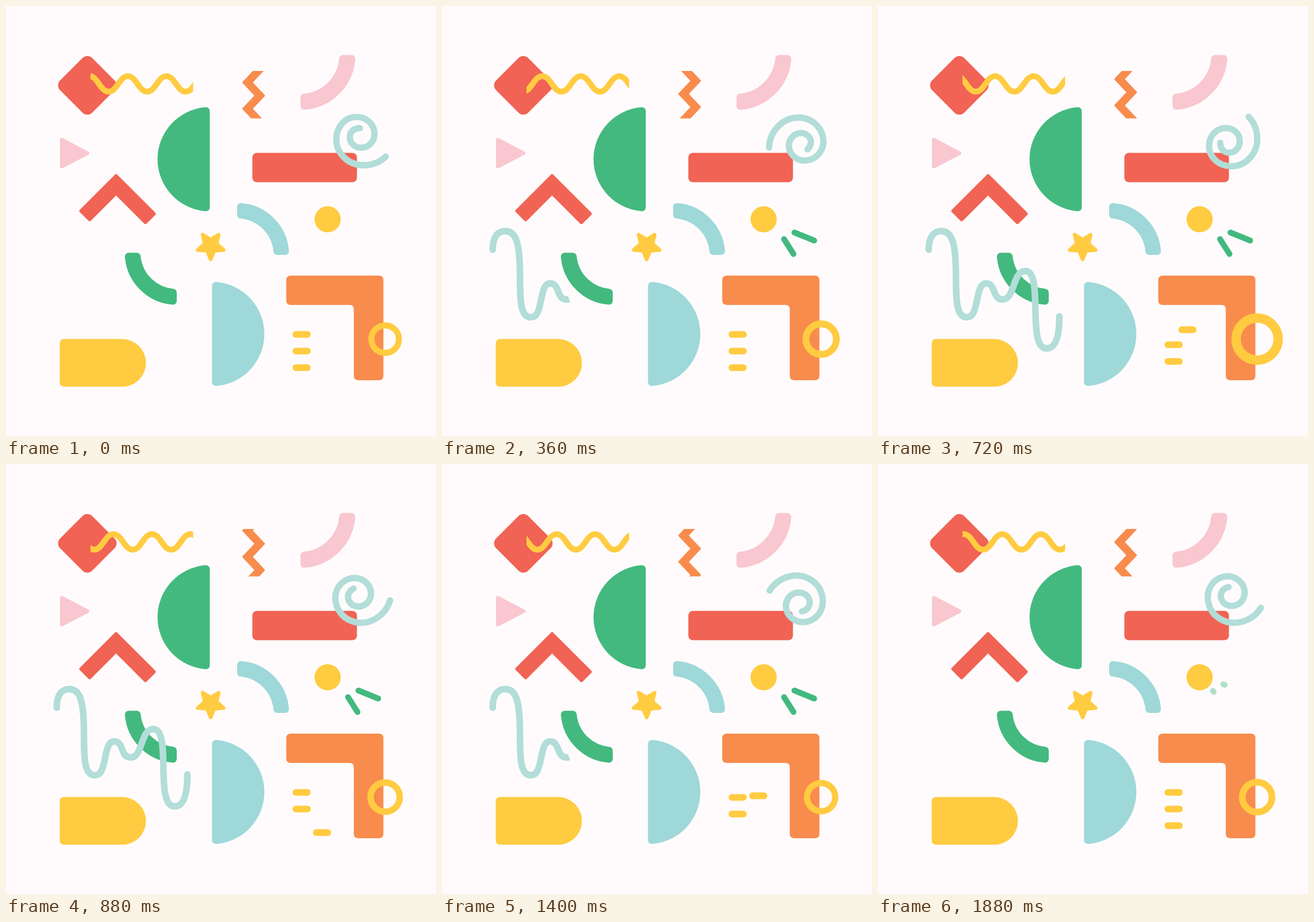
An HTML page that plays this animation: 748 px wide and 748 px high, repeating every 1920 ms.

```html
<!DOCTYPE html>
<html lang="en">
<head>
<meta charset="utf-8">
<title>Shapes</title>
<style>
  html, body { margin: 0; width: 100%; height: 100%; overflow: hidden; background: #fffbfc; }
  svg { display: block; width: 100%; height: 100%; }
  .red { fill: #f16354; stroke: #f16354; }
  .yellow { fill: #ffcb40; stroke: #ffcb40; }
  .green { fill: #43b97f; stroke: #43b97f; }
  .teal { fill: #9fd8d9; stroke: #9fd8d9; }
  .mint { fill: #b2ddd8; stroke: #b2ddd8; }
  .pink { fill: #f9c7cf; stroke: #f9c7cf; }
  .orange { fill: #f88c4d; stroke: #f88c4d; }
  .flat { stroke: none; }
  .line { fill: none; }
  .soft { stroke-width: 6; stroke-linejoin: round; }
  .round { stroke-linecap: round; }
</style>
</head>
<body>
<svg viewBox="0 0 748 748">
  <defs>
    <clipPath id="waveBox"><rect x="147" y="105" width="178.5" height="60"/></clipPath>
    <clipPath id="zigBox"><rect x="405" y="113" width="50" height="82.5"/></clipPath>
  </defs>

  <rect class="red flat" x="102" y="98.5" width="79" height="79" rx="12" transform="rotate(45 141.5 138)"/>
  <path class="pink soft" d="M97 232.5V279.5L142 256Z"/>
  <path class="green flat" d="M347 176Q354.5 176 354.5 183.5V349.5Q354.5 357 347 357A90.8 90.8 0 0 1 347 176Z"/>
  <path class="red soft" d="M191.5 295.5L257.5 361.5L242.5 376.5L191.5 325.5L145.5 371.5L130.5 356.5Z"/>
  <rect class="red flat" x="428.5" y="255.5" width="182" height="51" rx="8"/>
  <circle class="yellow flat" cx="559.5" cy="371" r="22.8"/>
  <path class="teal flat" d="M366 480Q358.3 480 358.3 487.5V653.5Q358.3 661 366 661A90.8 90.8 0 0 0 366 480Z"/>
  <path class="yellow flat" d="M101.5 579.3H202A41.5 41.5 0 0 1 202 662.3H101.5Q93.5 662.3 93.5 654.3V587.3Q93.5 579.3 101.5 579.3Z"/>
  <path class="orange flat" d="M495.5 469H648.5Q656.5 469 656.5 477V643Q656.5 651 648.5 651H613Q605 651 605 643V527.5Q605 520 597.5 520H495.5Q487.5 520 487.5 512V477Q487.5 469 495.5 469Z"/>
  <path id="star" class="yellow soft"/>
  <g id="arcs"></g>

  <g clip-path="url(#waveBox)"><path id="wave" class="yellow line" stroke-width="10"/></g>
  <g clip-path="url(#zigBox)"><path id="zig" class="orange" stroke-width="3" stroke-linejoin="round"/></g>

  <path id="spiral" class="mint line round" stroke-width="11" d="M660.5 262C650 272 636 277 622 277C596 277 574.5 257 574.5 232C574.5 210 590 193 610 193C627 193 641 206 641 222C641 236 631 246.5 618 246.5C607 246.5 598 238.5 598 228C598 219 605 212.5 615.5 212.5"/>

  <g id="rays" class="green line round" stroke-width="10">
    <path pathLength="1" d="M595 405.5L611.5 431.5"/>
    <path pathLength="1" d="M613 394L647.5 408"/>
  </g>

  <g id="squiggle" class="mint">
    <path class="line" pathLength="1" stroke-width="11.5" d="M88.3 424C88 403 96 391.5 110 391.5C127 391.5 135 408 135.5 461C136 505 134 541.5 155 541.5C177 541.5 168 482.5 188 482.5C206 482.5 198 510.5 217 510.5C238 510.5 234 461 256 461C290 461 257 595.5 293.5 595.5C311 595.5 315.5 570 315.5 540"/>
    <circle class="flat" cx="88.3" cy="424" r="5.75"/>
    <circle class="flat" cx="315.5" cy="540" r="5.75"/>
  </g>

  <g id="dashes" class="yellow flat">
    <rect width="31.5" height="11.6" rx="5.6"/>
    <rect width="31.5" height="11.6" rx="5.6"/>
    <rect width="31.5" height="11.6" rx="5.6"/>
  </g>

  <circle id="ring" class="yellow line" cx="659.5" cy="579.5"/>
</svg>
<script>
const LOOP = 1920, STEP = 40;
const $ = id => document.getElementById(id);
const set = (el, attrs) => { for (const k in attrs) el.setAttribute(k, attrs[k]); };
const clamp = v => Math.min(1, Math.max(0, v));
const ease = v => (1 - Math.cos(Math.PI * clamp(v))) / 2;

// Linear interpolation in a table of [time, value] rows; `col` picks the value.
function at(rows, t, col = 1) {
  const i = rows.findIndex(r => r[0] > t);
  if (i < 0) return rows[rows.length - 1][col];
  if (i === 0) return rows[0][col];
  const a = rows[i - 1], b = rows[i];
  return a[col] + (b[col] - a[col]) * (t - a[0]) / (b[0] - a[0]);
}

function drawStar() {
  const pts = [];
  for (let i = 0; i < 10; i++) {
    const r = i % 2 ? 11 : 24, a = Math.PI / 2 + i * Math.PI / 5;
    pts.push((356 + r * Math.cos(a)).toFixed(2) + ' ' + (417 + r * Math.sin(a)).toFixed(2));
  }
  set($('star'), { d: 'M' + pts.join('L') + 'Z' });
}

// Quarter band with rounded corners around (x, y).
function drawArc(color, x, y, sx, sy, inner, outer) {
  const c = 6.5, a = inner + c, b = outer - c;
  const p = Math.sqrt(a * a - c * c), q = Math.sqrt(b * b - c * c);
  const el = document.createElementNS('http://www.w3.org/2000/svg', 'path');
  set(el, {
    class: color, 'stroke-width': 2 * c, 'stroke-linejoin': 'round',
    transform: `translate(${x} ${y}) scale(${sx} ${sy})`,
    d: `M${q} ${c}A${b} ${b} 0 0 1 ${c} ${q}L${c} ${p}A${a} ${a} 0 0 0 ${p} ${c}Z`
  });
  $('arcs').append(el);
}

const WAVE = 67, ZIG = 45.7;

function drawWaves() {
  const half = WAVE / 2, k = 14.5;
  let x = 78, d = `M${x} 122`;
  for (let i = 0; i < 16; i++) {
    const y0 = i % 2 ? 149 : 122, y1 = 271 - y0;
    d += `C${x + k} ${y0} ${x + half - k} ${y1} ${x + half} ${y1}`;
    x += half;
  }
  set($('wave'), { d });

  const left = [], right = [];
  for (let i = 0; i < 12; i++) {
    const cx = i % 2 ? 441.5 : 420, y = 133 - ZIG + i * ZIG / 2;
    left.push(`${cx - 7.4} ${y}`);
    right.unshift(`${cx + 7.4} ${y}`);
  }
  set($('zig'), { d: 'M' + left.concat(right).join('L') + 'Z' });
}

const PULSE = [[0, 0], [16, 0], [88, .43], [192, .86], [220, 1], [372, .133], [404, 0]];
const HOP = [
  [0, 0, -57.8], [40, 6, -61], [80, 24, -66], [120, 36, -52], [160, 40, -24],
  [200, 38.5, 2.7], [240, 35.5, 12], [280, 20, 10], [320, 4.6, 2.7], [360, 0, 0]
];

const [trail, trailStart, trailEnd] = $('squiggle').children;
const rays = [...$('rays').children];
const [mover, upper, lower] = $('dashes').children;

function render(t) {
  const turn = t / LOOP;
  set($('wave'), { transform: `translate(${-(3 * turn % 1) * WAVE} 0)` });
  set($('zig'), { transform: `translate(0 ${-(3 * turn % 1) * ZIG})` });
  set($('spiral'), { transform: `rotate(${720 * turn} 618 235.2)` });

  const s = 1 + .54 * at(PULSE, t % 504);
  set($('ring'), { r: 23.9 * s, 'stroke-width': 10.6 * s });

  const drawn = t < 1080 ? ease(t / 680) : 1 - ease((t - 1080) / 680);
  set(trail, { 'stroke-dasharray': `${drawn} 2` });
  set($('squiggle'), { visibility: drawn > 0.001 ? 'visible' : 'hidden' });
  set(trailEnd, { opacity: drawn > 0.999 ? 1 : 0 });

  const out = t < 960 ? clamp((t - 40) / 190) : clamp((1892 - t) / 232);
  set($('rays'), {
    transform: `translate(${-13 * (1 - out)} ${-11.5 * (1 - out)})`,
    opacity: clamp(out * 8)
  });
  for (const ray of rays) set(ray, { 'stroke-dasharray': `${clamp(out * 1.3)} 2` });

  const u = t % 640, lift = 28.9 * ease(u / 190);
  set(mover, { x: 498.5 + at(HOP, u), y: 623.3 + at(HOP, u, 2) });
  set(upper, { x: 498.5, y: 594.4 - lift });
  set(lower, { x: 498.5, y: 623.3 - lift });
}

drawStar();
drawArc('pink', 512.3, 85.3, 1, 1, 67.5, 95.5);
drawArc('teal', 402, 433, 1, -1, 63.5, 90.5);
drawArc('green', 297, 429.3, -1, 1, 63, 90.5);
drawWaves();

const start = performance.now();
function tick() {
  const t = (performance.now() - start) % LOOP;
  render(Math.floor(t / STEP) * STEP);
  requestAnimationFrame(tick);
}
tick();
</script>
</body>
</html>
```
